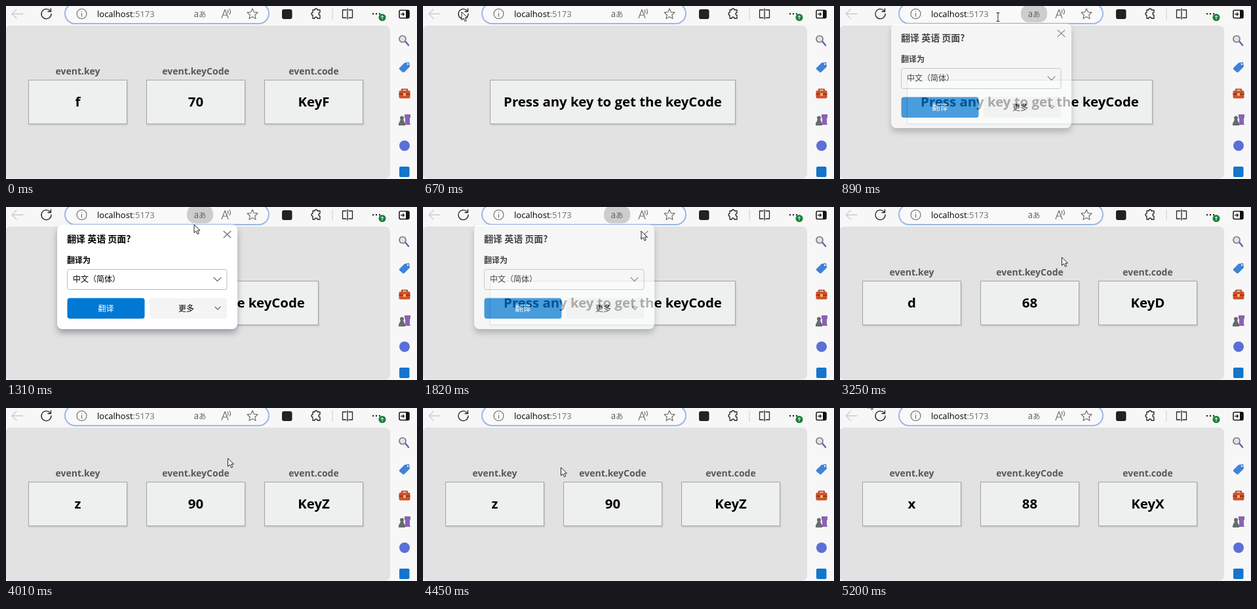
Recreate the animation shown at these times as an HTML page. Size 627 by 265 pixels, loop 5.34 s.

```html
<!DOCTYPE html>
<html lang="en">
<head>
<meta charset="utf-8">
<title>Key codes</title>
<style>
html, body { margin: 0; height: 100%; overflow: hidden; background: #f7f7f7; }
svg { display: block; }
text { font-family: "Open Sans", "Noto Sans", sans-serif; }
.cjk text, text.cjk { font-family: "Noto Sans CJK SC", "Noto Sans CJK", sans-serif; }
.box { fill: #edf0ef; stroke: #a3a3a3; filter: drop-shadow(1px 2px 1px rgba(0,0,0,.1)); }
.value { font-size: 20.4px; font-weight: 700; text-anchor: middle; }
.label { font-size: 14px; font-weight: 700; text-anchor: middle; fill: #585858; }
.line { fill: none; stroke: #222; stroke-width: 1.3; stroke-linecap: round; stroke-linejoin: round; }
.soft { stroke: #666; stroke-width: 1.1; }
.card { fill: #fff; filter: drop-shadow(0 6px 5px rgba(50,60,75,.4)); }
</style>
</head>
<body>
<svg width="627" height="265" viewBox="0 0 627 265">
  <rect width="627" height="265" fill="#f7f7f7"/>
  <rect x="-1" y="30" width="587" height="234.5" rx="8" fill="#e2e2e2"/>

  <!-- toolbar -->
  <rect x="90" y="-4" width="311" height="31" rx="15.5" fill="#f9f9f9" stroke="#9db6e8" stroke-width="2"/>
  <path class="line" style="stroke:#ccc" d="M26 12H9m7-7-7 7 7 7"/>
  <path class="line" d="M67 7A7.5 7.5 0 1 0 69 12M68.5 4v4.500H64"/>
  <circle class="line soft" cx="115.5" cy="12" r="7.5"/>
  <path class="line soft" d="M115.5 11v5m0-8v.3"/>
  <text x="139" y="17" font-size="13">localhost<tspan fill="#707070">:5173</tspan></text>
  <rect id="pill" x="276" y="-2" width="40" height="27" rx="12" fill="#cdcdcd"/>
  <text class="cjk" x="286.5" y="16.5" font-size="13.5" fill="#666">a<tspan font-size="11.5">あ</tspan></text>
  <path class="line soft" d="M329 18.5 334 5.500l5 13M331 14h6M338 6q2 2 0 5M341 4.500q3 4 0 8"/>
  <path class="line soft" id="star"/>
  <rect x="421" y="5" width="15.5" height="15" rx="3" fill="#222"/>
  <path class="line" d="M468 6h3a2 2 0 0 1 4 0h4v4a2 2 0 0 0 0 4v5h-4a2 2 0 0 0-4 0h-3v-5a2 2 0 0 1 0-4Z"/>
  <path d="M498 4v17" stroke="#ccc"/>
  <path class="line" d="M519 6h-5.500v12h5.500M523 6h5.500v12H523M521 4v16"/>
  <path d="M560 12h12" stroke="#222" stroke-width="2.4" stroke-linecap="round" stroke-dasharray="0 5"/>
  <circle cx="574" cy="17.5" r="5.5" fill="#16803c"/>
  <path d="M574 20.5V15m-2.200 2 2.200-2.200 2.200 2.200" fill="none" stroke="#fff"/>
  <rect x="600" y="6.5" width="15" height="12" rx="2" fill="#fff" stroke="#111" stroke-width="1.5"/>
  <path d="M610 7h5v11h-5z" fill="#111"/>
  <path class="line" d="M602.5 12.5h5m-2-2 2 2-2 2"/>

  <!-- sidebar -->
  <path d="m609 54 5 6" stroke="#7b5ea8" stroke-width="2.6" stroke-linecap="round"/>
  <circle cx="605" cy="50.5" r="5" fill="#dde3e8" stroke="#777c84" stroke-width="1.7"/>
  <path d="m600 95 8-8 7-1 1 7-8 8-2 1-6-5Z" fill="#3f82d6"/>
  <circle cx="613" cy="89" r="1.2" fill="#fff"/>
  <path d="M604 130v-2.500h8v2.500" fill="none" stroke="#9d3516" stroke-width="1.7"/>
  <rect x="599.5" y="129.5" width="17" height="12" rx="2" fill="#d0502c"/>
  <path d="M599.5 135h17" stroke="#8c2d14" stroke-width="1.5"/>
  <path d="M606 133.5h4v4h-4z" fill="#f2c25c"/>
  <path d="M608 166h9v5l-1 1v7l1 3h-9l1-3v-7l-1-1Z" fill="#8a62b4"/>
  <path d="M599 183v-3l3.500-7h3l3.500 7v3Z" fill="#666b70"/>
  <circle cx="604" cy="171.5" r="3" fill="#666b70"/>
  <circle cx="608" cy="214" r="8" fill="#5b6fd8"/>
  <rect x="600" y="246" width="15.5" height="16" rx="2" fill="#1475cc"/>

  <!-- page -->
  <g id="prompt">
    <rect class="box" x="102.5" y="113.5" width="374" height="67"/>
    <text class="value" x="289.5" y="154">Press any key to get the keyCode</text>
  </g>
  <g id="panels"></g>

  <!-- translate popup -->
  <g id="popup" class="cjk">
    <rect class="card" x="78" y="27" width="275" height="160" rx="8"/>
    <text x="93" y="54" font-size="14" font-weight="700">翻译 英语 页面?</text>
    <path class="line soft" d="m332 37 11 10m0-10-11 10"/>
    <text x="93" y="85.5" font-size="12" font-weight="700">翻译为</text>
    <rect x="93.5" y="95.5" width="243.5" height="31" rx="3" fill="#fff" stroke="#bbb"/>
    <text x="102" y="115" font-size="12">中文（简体）</text>
    <path class="line soft" d="m317 108 5.500 5.500 5.500-5.500"/>
    <rect x="93.5" y="139.5" width="118" height="31.5" rx="4" fill="#0078d4"/>
    <text x="152.5" y="159.5" font-size="12" fill="#fff" text-anchor="middle">翻译</text>
    <rect x="219" y="139.5" width="118" height="31.5" rx="4" fill="#f4f4f4"/>
    <text x="275" y="159.5" font-size="12" text-anchor="middle">更多</text>
    <path class="line soft" d="m319 153 4 4 4-4"/>
  </g>

  <g id="cursor">
    <path id="arrow" d="M0 0v12.500l3-2.700 2 4.700 2.200-1-2-4.500H9Z" fill="#fff" stroke="#222"/>
    <path id="beam" d="M-2.500-6.500h5M0-6.500v13M-2.500 6.500h5" fill="none" stroke="#222"/>
  </g>
</svg>
<script>
const $ = id => document.getElementById(id);
const show = (id, on) => $(id).style.display = on ? '' : 'none';
const clamp = v => Math.max(0, Math.min(1, v));

const LOOP = 5340, START = 90, STEP = 80;
const presses = { 0: 'f', 670: '', 2600: 's', 3250: 'd', 3560: 'f', 4010: 'z', 4760: 'x' };

// the pointer rests between moves; it enters and leaves at the top edge
const home = { x: 43, y: -12 };
const moves = [
  { from: 90, to: 490, x: 59, y: 9 },
  { from: 670, to: 890, x: 241, y: 17 },
  { from: 970, to: 1610, x: 333, y: 37 },
  { from: 1850, to: 2090, x: 338.5, y: 77 },
  { from: 4010, to: 4410, x: 210.5, y: 91 },
  { from: 4530, to: 5130, ...home },
];

function pointer(t) {
  return moves.reduce((p, m) => {
    const k = clamp((t - m.from) / (m.to - m.from));
    return { x: p.x + (m.x - p.x) * k, y: p.y + (m.y - p.y) * k };
  }, home);
}

$('panels').innerHTML = ['key', 'keyCode', 'code'].map((name, i) => {
  const x = 109.5 + 180 * i;
  return `<text class="label" x="${x}" y="105">event.${name}</text>
    <rect class="box" x="${x - 75}" y="113.5" width="150" height="67"/>
    <text class="value" x="${x}" y="154"></text>`;
}).join('');
const values = document.querySelectorAll('#panels .value');

$('star').setAttribute('d', 'M' + Array.from({ length: 10 }, (_, i) => {
  const r = i % 2 ? 4 : 8.5, a = i * Math.PI / 5;
  return [376 + r * Math.sin(a), 12.5 - r * Math.cos(a)];
}).join('L') + 'Z');

function draw(time) {
  const key = presses[Object.keys(presses).findLast(at => at <= time)];
  show('prompt', !key);
  show('panels', key);
  if (key) {
    const upper = key.toUpperCase();
    [key, upper.charCodeAt(0), 'Key' + upper].forEach((v, i) => values[i].textContent = v);
  }

  // motion is seen in steps, like a screen recording
  const t = START + Math.floor((time - START) / STEP) * STEP;
  const alpha = clamp(Math.min((t - 670) / 320, (1930 - t) / 230));
  $('popup').style.opacity = alpha;
  show('pill', alpha > 0);

  const { x, y } = pointer(t);
  const overText = x > 130 && x < 275 && y > 0 && y < 27;
  $('cursor').setAttribute('transform', `translate(${x} ${y})`);
  show('cursor', time >= START);
  show('arrow', !overText);
  show('beam', overText);
}

const start = performance.now();
function loop() {
  draw((performance.now() - start) % LOOP);
  requestAnimationFrame(loop);
}
loop();
</script>
</body>
</html>
```
